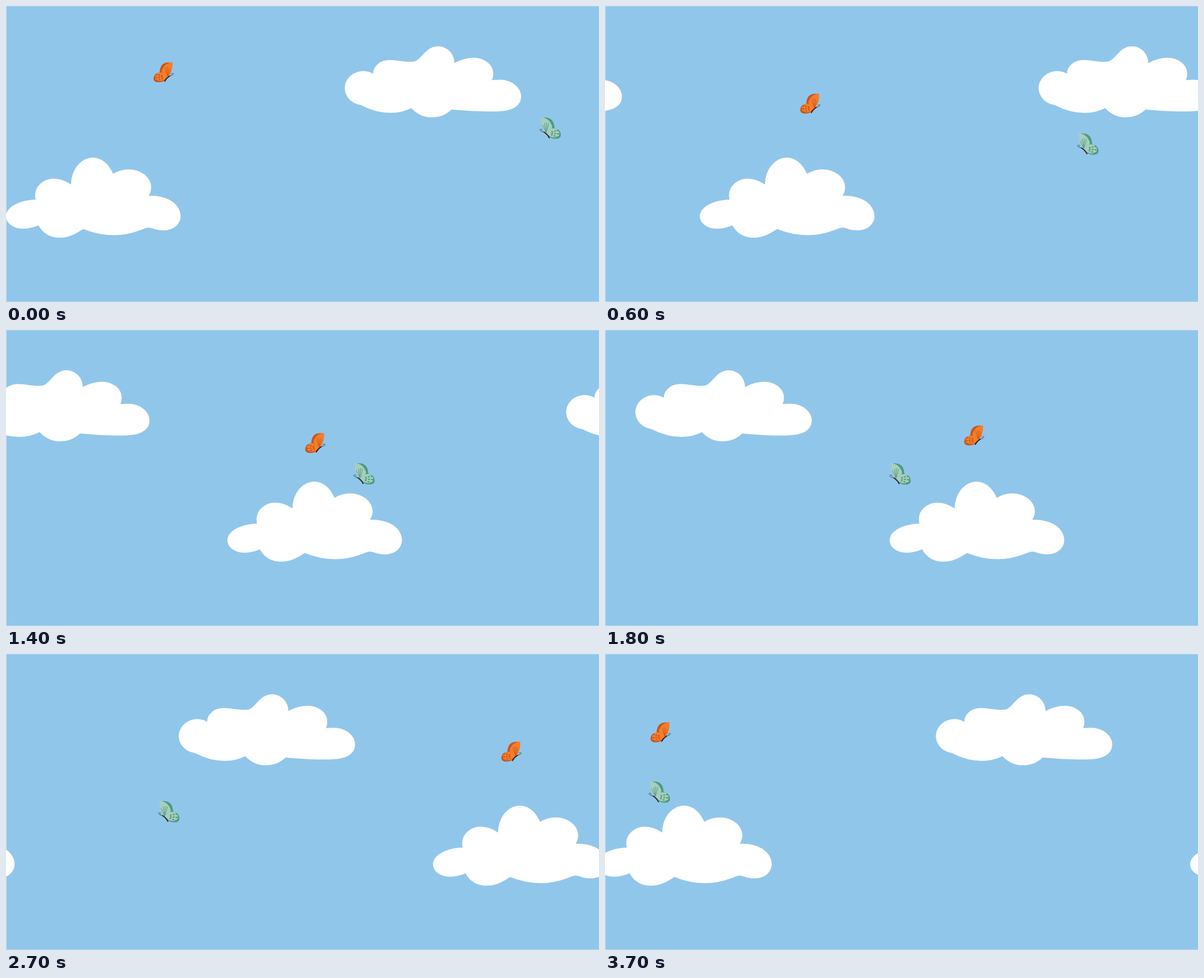
These frames come from a looping animation (1058x529 px, 3.8 s). An HTML page:

```html
<!DOCTYPE html>
<html lang="en">
<head>
<meta charset="utf-8">
<title>Butterfly sky</title>
<style>
  html, body { margin: 0; width: 100%; height: 100%; overflow: hidden; background: #fff; }
  svg { display: block; width: 100%; height: 100%; }
</style>
</head>
<body>
<svg viewBox="0 0 1058 529" preserveAspectRatio="none">
  <defs>
    <g id="clouds" fill="#fff">
      <path d="M633 177A33 30.5 0 1 1 655 121A29 24.5 0 0 1 684 96.500C698 96.500 713 101 727 99.500S748 72 771 72
        A29 30 0 0 1 800 102Q817 92.500 835 92.500A34.500 28.500 0 0 1 869.500 121Q869.500 127 867 132.500
        Q874 131.800 881 131.800A38 30 0 0 1 919 161.500C919 175 909 184 891 187Q865 191 795 185
        A50 50 0 0 1 723 182.500Q707 191 686 191Q660 191 633 177Z"/>
      <path d="M0 376C0 360 22 347 53 346Q52 342 52 338A33 29.500 0 0 1 85 308.500Q101 308.500 116 319
        A39 48 0 0 1 155 271C171 271 184 283 191 300Q204 292 219 292A40 32 0 0 1 259 324Q259 332 254.500 339
        C290 338 311.500 355 311.500 376A29.500 25 0 0 1 282 401C266 401 261 396 254 396S226 409.500 193 409.500
        Q164 409.500 138 398.500C126 406 114 414 96 414Q70 414 58 392Q44 398 29 398A29 22 0 0 1 0 376Z"/>
    </g>
  </defs>
  <rect x=".5" y=".25" width="1057.5" height="528.4" fill="#91c6eb"/>
  <g id="sky"></g>
</svg>
<script>
const WIDTH = 1058, LOOP = 3800, STEP = 100;
const DRIFT = 28.215;
const NS = "http://www.w3.org/2000/svg";
const sky = document.getElementById("sky");

// Two copies of everything let shapes leave on one side and enter on the other.
function addPair(markup) {
  return [0, 1].map(() => {
    const g = document.createElementNS(NS, "g");
    g.innerHTML = markup;
    sky.append(g);
    return g;
  });
}

function repeat(count, make) {
  return Array.from({ length: count }, (_, i) => make(i)).join("");
}

function butterfly(light, dark) {
  // Veins and spots fan out from the point where the wings meet.
  const vein = i => `M25.500 25.500Q${22 + 2.5 * i} 17 ${21 + 3.5 * i} ${10 - 2 * i + i * i}`;
  const spot = i => {
    const reach = 10 + 5 * (i % 3);
    const turn = (Math.floor(i / 3) * 16 - 10) * Math.PI / 180;
    const x = 25 - reach * Math.cos(turn), y = 26 + reach * Math.sin(turn);
    return `<ellipse cx="${x}" cy="${y}" rx="${1 + reach * .05}" ry="1.2"/>`;
  };
  return `
    <path fill="${dark}" d="M11 21Q11 2 25 1Q30 0 32 2L24 25Q17 18 11 21Z"/>
    <path fill="${light}" d="M25 27C18 23 13 18 16 13C19 6 25 1 34 .500Q35 14 28 25Z"/>
    <path fill="none" stroke="${dark}" stroke-width=".9" d="${repeat(4, vein)}"/>
    <path fill="${dark}" d="M25 26C18 15 2 18 .500 28C-1 36 7 37 13 36Q21 35 25 26Z"/>
    <path fill="${light}" d="M25 26C19 16 5 17 3 26C2 33 8 34.500 13 34Q21 33 25 26Z"/>
    <g fill="${dark}">${repeat(9, spot)}</g>
    <g fill="none" stroke-linecap="round">
      <path stroke="#2b211f" stroke-width="1.9" d="M20 34.500Q23 29 29 25"/>
      <path stroke="#31465f" stroke-width=".6" d="M30 25L35.500 20.500Q33.500 19.500 31.500 21M30 25Q35 24.500 36.400 21"/>
    </g>`;
}

// Key points of each flight: step, left, top.
const flights = [
  {
    pair: butterfly("#f57e29", "#c9551f"), scale: "",
    points: [[0, 263, 100], [6, 348, 156], [11, 457, 188], [18, 640.5, 170], [27, 883.5, 156], [32, 989, 121.5], [37, 1139, 121.5]]
  },
  {
    pair: butterfly("#a6cfbd", "#4f9a81"), scale: "translate(38.8 0) scale(-1.05 1.07)",
    points: [[0, 951.5, 198.5], [6, 842, 227], [11, 704.5, 237.5], [18, 507, 237.5], [27, 271, 262], [32, 169, 251.5], [37, 77.5, 227]]
  }
];

function slope(points, i, axis) {
  const a = points[Math.max(i - 1, 0)], b = points[Math.min(i + 1, points.length - 1)];
  return (b[axis] - a[axis]) / (b[0] - a[0]);
}

// Smooth cubic through the key points.
function along(points, step, axis) {
  let i = 0;
  while (i < points.length - 2 && step >= points[i + 1][0]) i++;
  const a = points[i], b = points[i + 1], span = b[0] - a[0];
  const u = (step - a[0]) / span, v = 1 - u;
  return a[axis] * v * v * (1 + 2 * u) + b[axis] * u * u * (1 + 2 * v)
    + span * u * v * (slope(points, i, axis) * v - slope(points, i + 1, axis) * u);
}

function place(pair, x, y, scale = "") {
  pair.forEach((g, i) =>
    g.setAttribute("transform", `translate(${x - i * WIDTH} ${y}) ${scale}`));
}

const clouds = addPair('<use href="#clouds"/>');
for (const flight of flights) flight.pair = addPair(flight.pair);

function draw(time) {
  const step = Math.floor((time % LOOP) / STEP);
  place(clouds, step * DRIFT, 0);
  for (const { pair, points, scale } of flights)
    place(pair, along(points, step, 1), along(points, step, 2), scale);
}

const start = performance.now();
function tick() {
  draw(performance.now() - start);
  requestAnimationFrame(tick);
}
tick();
</script>
</body>
</html>
```
